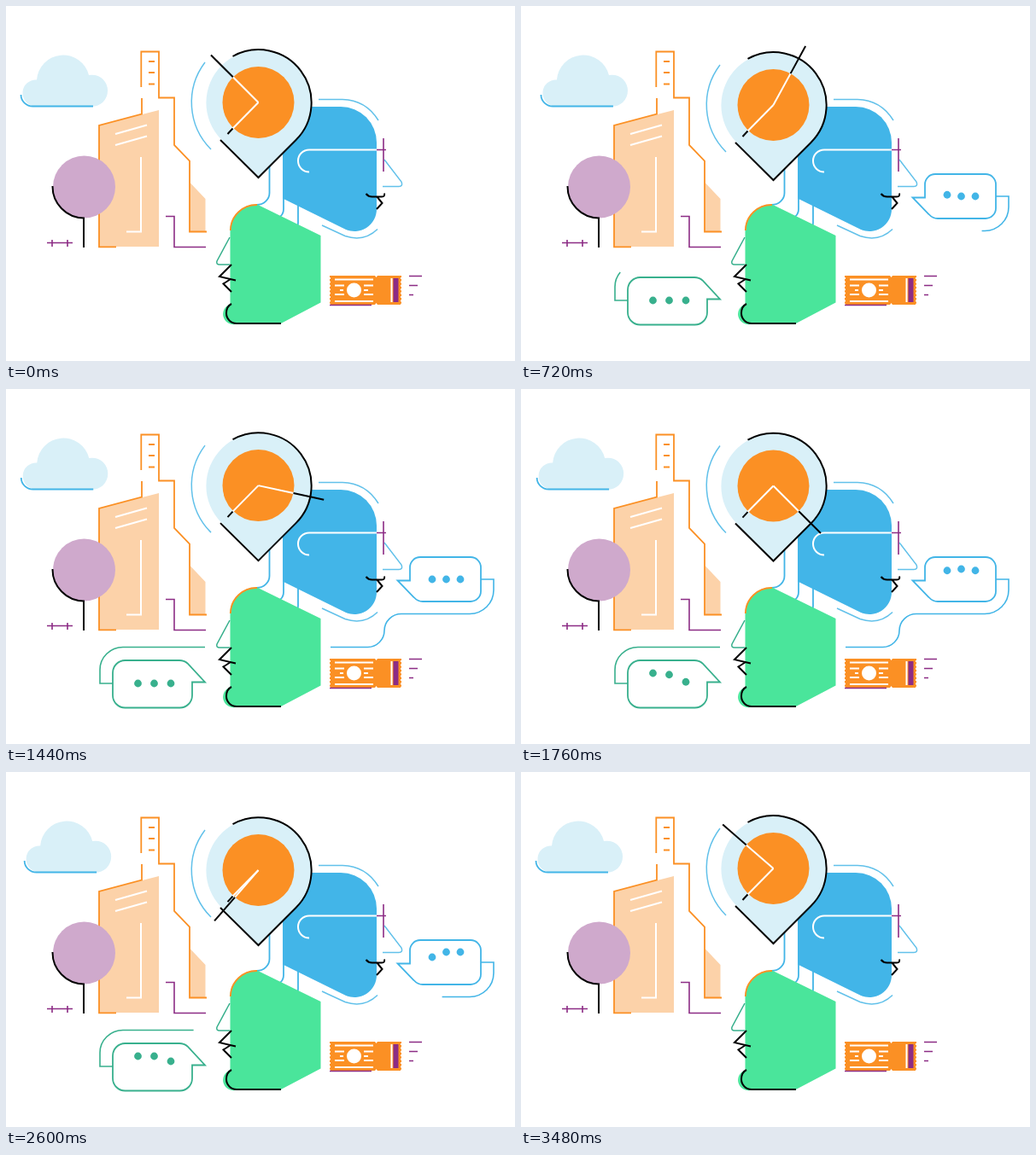
Recreate the animation shown at these times as an HTML page. Size 596 by 416 pixels, loop 3.52 s.

```html
<!DOCTYPE html>
<html lang="en">
<head>
<meta charset="utf-8">
<title>City talk</title>
<style>
  html, body { margin: 0; width: 100%; height: 100%; overflow: hidden; background: #fff; }
  svg { display: block; width: 596px; height: 416px; fill: none; stroke-width: 1.8; }
  .orange { stroke: #fb9024; }
  .blue { stroke: #42b5e7; }
  .thin { stroke: #62c1ea; stroke-width: 1.5; }
  .green { stroke: #38b08d; }
  .purple { stroke: #8c2c85; stroke-width: 1.6; }
  .black { stroke: #000; stroke-width: 2; }
  .white { stroke: #fff; stroke-width: 2; }
  .ice { fill: #d9f0f8; }
  .peach { fill: #fcd2a9; }
</style>
</head>
<body>
<svg viewBox="0 0 596 416">
  <g id="cloud">
    <path class="ice" d="M34 117.5a15.5 15.5 0 0 1 2-31a31 31 0 0 1 61-5.500a18.300 18.300 0 1 1 7 36.500z"/>
    <path class="blue" d="M17.500 104a14 13.500 0 0 0 14 13.500H102"/>
  </g>

  <g id="city">
    <path class="peach" d="M109 140L179 122V282H109zM215.500 207L233.500 226V264H215.500z"/>
    <path class="orange" d="M129 282.300H109V140L159 126.500V108M158.300 95V53.500H179V107.500H197V163L215 181.500V264.500H235M167 65h7M167 78h7M167 91.500h7"/>
    <path class="white" d="M128 150L165 139.500M128 163L165 152.500M158 177V264.500H141"/>
    <path class="purple" d="M187 246.500H197V282.500H234M48 277.500H78M54 274v8M72 274v8"/>
    <circle cx="91.500" cy="212" r="36.500" fill="#cfa9cc"/>
    <path class="black" d="M54.500 211A37 37 0 0 0 91 248.500V283"/>
  </g>

  <g id="blueHead">
    <path fill="#42b5e8" d="M324 118H392A42 42 0 0 1 434 160V238A26 26 0 0 1 397 261.500L324 225.500z"/>
    <path class="blue" d="M308.500 186V219a15 14 0 0 1-15 14M325 225V238a12 12 0 0 1-12 12M342 233V254a13 14 0 0 1-13 14"/>
    <path class="thin" d="M366 109.500H394Q421 110 436 134M370 257L397 269.500Q419 277 435 261.500M443 180L463 206Q465 211.500 460 211.500H441"/>
    <path class="white" d="M434 168.500H355a13 13 0 0 0 0 26"/>
    <path class="purple" d="M434 168.500H445M442 155V194"/>
    <path class="black" d="M421.500 220q3 3.500 7 3.500H440q4 0 3-4M434 223L440.500 231L434 238"/>
  </g>

  <g id="greenHead">
    <path fill="#4ae59b" d="M262.500 264A31 31 0 0 1 294 232.500L368.500 269V347.500L321 372.500H270a12 12 0 0 1-7.500-23z"/>
    <path class="orange" d="M262.800 263A30.500 30.500 0 0 1 294 233"/>
    <path class="green" stroke-width="1.500" d="M262 271L247 299Q246 303 250 303H262"/>
    <path class="black" d="M264 303L250 317L269 321.500M263 320L254.500 325.500L264 335M264 349q-6 3-6 11a12 12 0 0 0 12 12H322"/>
  </g>

  <g id="ticket">
    <path fill="#fb9024" d="M379 316H432l1.500 2l1.500-2H463V350H435l-1.500-2l-1.500 2H379z"/>
    <path class="white" stroke-dasharray="2 2.400" d="M379 318V350M463 318V350"/>
    <path class="white" d="M385 320.500H430M385 346H430M385 327.500h11M391 333h4M385 338h11M419 327.500h11M419 333h5M419 338h11M451.500 319V347"/>
    <circle cx="407.500" cy="333" r="8.500" fill="#fff"/>
    <path fill="#8c2c85" d="M453.500 319h6v28h-6z"/>
    <path class="purple" d="M379 350.500H428M472 316.500h15M472 327.500h10M472 338.500h5"/>
  </g>

  <g id="pin">
    <path class="thin" d="M233 66A78 78 0 0 0 240 168"/>
    <path class="ice" d="M252.300 156.700A61.500 61.500 0 1 1 339.500 156.700L295.800 200.500z"/>
    <path class="black" d="M265.500 59A62 62 0 0 1 339.500 157L295.500 201L251 157"/>
    <circle cx="295.500" cy="113" r="42" fill="#fb9024"/>
    <path class="white" d="M295.500 113L265.500 143.500"/>
    <path class="black" d="M265.500 143.500L259.500 150"/>
    <g id="hand">
      <path class="white" d="M295.500 113h42"/>
      <path class="black" d="M337.500 113h36.500"/>
    </g>
  </g>

  <path id="blueTrail" class="blue" pathLength="1" stroke-width="1.600" d="M556 223H571V235.500A28 28 0 0 1 543 263.500H463A20 20 0 0 0 443 283A19.500 19.500 0 0 1 423.500 302.500H380"/>
  <path id="greenTrail" class="green" pathLength="1" stroke-width="1.600" d="M125 345H110V329A27 26.500 0 0 1 137 302.500H233"/>
  <g id="blueBubble">
    <path class="blue" d="M458.500 224.500H473V209a12 12 0 0 1 12-12H544a12 12 0 0 1 12 12V237a12 12 0 0 1-12 12H488Q482 249 477.500 244z"/>
  </g>
  <g id="greenBubble">
    <path class="green" d="M233 343.500H218V359a14.500 14.500 0 0 1-14.500 14.500H139.500A14.500 14.500 0 0 1 125 359V332.500A14.500 14.500 0 0 1 139.500 318H203Q208.500 318 212.500 321.500z"/>
  </g>
</svg>
<script>
const LOOP = 3520, STEP = 40;
const byId = id => document.getElementById(id);
const progress = (t, start, length) => Math.min(1, Math.max(0, (t - start) / length));
const smooth = p => (1 - Math.cos(Math.PI * p)) / 2;
const easeOut = p => 1 - (1 - p) ** 3;
const backIn = (p, s) => p * p * ((s + 1) * p - s);

function makeTalk(name, color, options) {
  const bubble = byId(name + 'Bubble');
  const dots = options.dotsX.map(x => {
    const dot = document.createElementNS('http://www.w3.org/2000/svg', 'circle');
    dot.setAttribute('cx', x);
    dot.setAttribute('r', 4.4);
    dot.setAttribute('fill', color);
    return bubble.appendChild(dot);
  });
  return { ...options, bubble, dots, trail: byId(name + 'Trail') };
}

const talks = [
  makeTalk('blue', '#42b5e7', {
    tip: [458.5, 224], dotsX: [499, 515.5, 532], dotY: 223, lag: 0,
    enter: [120, 480], exit: [2760, 500], back: 2.65, retract: 2230
  }),
  makeTalk('green', '#38b08d', {
    tip: [233, 344], dotsX: [154.5, 173.5, 193], dotY: 345, lag: 80,
    enter: [160, 560], exit: [2960, 410], back: 1.7, retract: 2480
  })
];

// Three hops, 800 ms apart: rise, short hold, fall.
function hop(t) {
  const since = t - 680;
  if (since < 0 || since >= 2400) return 0;
  const u = since % 800;
  return 12 * (smooth(progress(u, 0, 160)) - smooth(progress(u, 240, 160)));
}

function drawTalk(talk, t) {
  const scale = easeOut(progress(t, ...talk.enter)) - backIn(progress(t, ...talk.exit), talk.back);
  const [x, y] = talk.tip;
  talk.bubble.setAttribute('transform', `translate(${x} ${y}) scale(${scale}) translate(${-x} ${-y})`);
  talk.dots.forEach((dot, i) => dot.setAttribute('cy', talk.dotY - hop(t - talk.lag - i * 80)));

  const shown = smooth(progress(t, 480, 660)) - smooth(progress(t, talk.retract, 660));
  talk.trail.style.visibility = shown > 0 ? 'visible' : 'hidden';
  talk.trail.setAttribute('stroke-dasharray', `${shown} 2`);
}

function draw(t) {
  const bob = t < 3080 ? smooth(t / 770) : 0;
  byId('cloud').setAttribute('transform', `translate(${6 * bob} 0)`);
  byId('pin').setAttribute('transform', `translate(0 ${3 * bob})`);
  byId('hand').setAttribute('transform', `rotate(${t / LOOP * 360 - 135} 295.5 113)`);
  talks.forEach(talk => drawTalk(talk, t));
}

let begin;
function tick(now) {
  begin ??= now;
  draw(Math.floor((now - begin) % LOOP / STEP) * STEP);
  requestAnimationFrame(tick);
}
draw(0);
requestAnimationFrame(tick);
</script>
</body>
</html>
```
